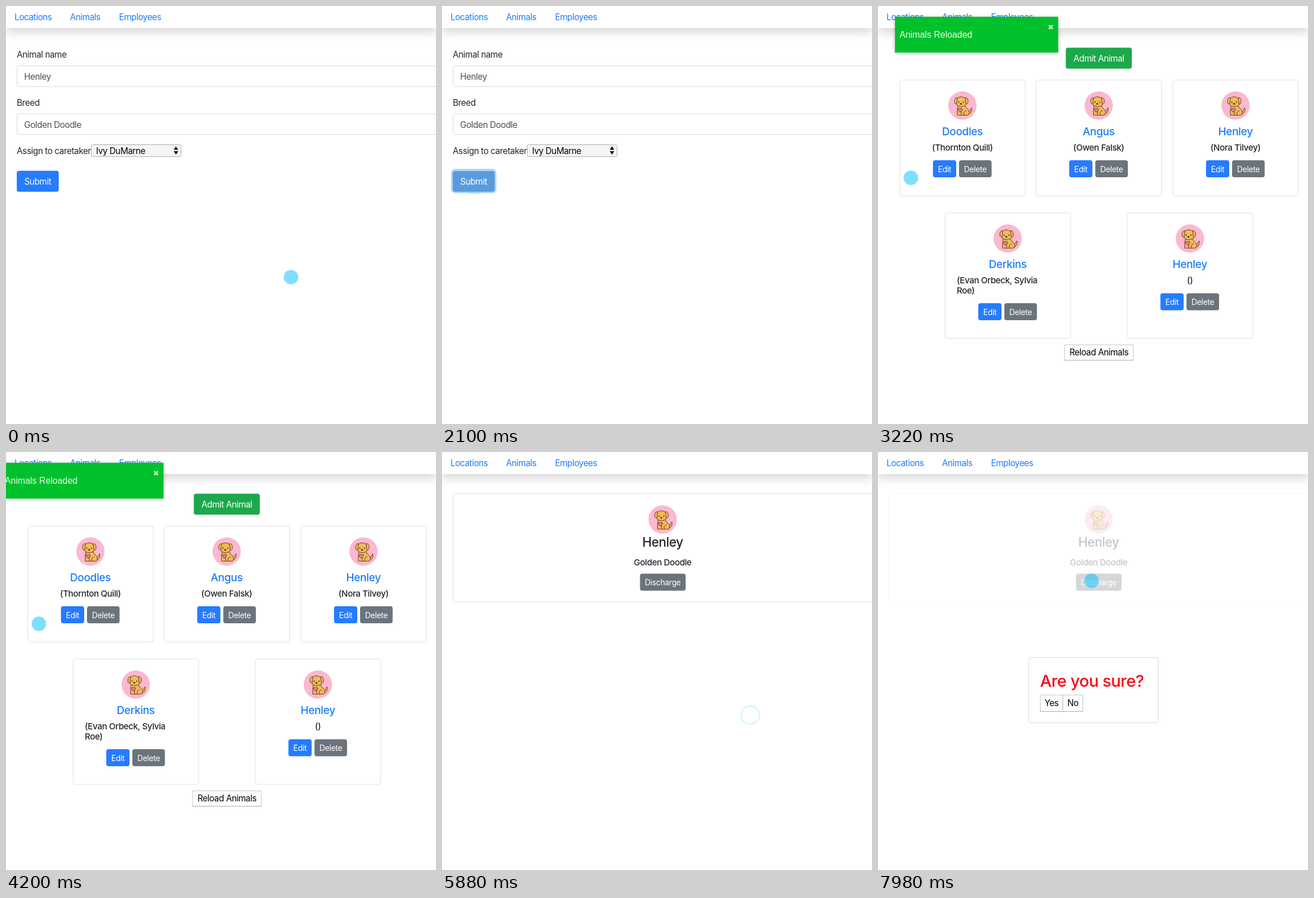
These frames come from a looping animation (759x737 px, 8 s). An HTML page:

```html
<!DOCTYPE html>
<html lang="en">
<head>
<meta charset="utf-8">
<title>Animal kennel</title>
<style>
  html, body { margin: 0; width: 100%; height: 100%; overflow: hidden; background: #fff; }
  svg { display: block; }
  text { font-family: Inter, "Open Sans", sans-serif; letter-spacing: -.028em; white-space: pre; }
  .big { letter-spacing: -.02em; }
  .toast text { font-family: "Liberation Sans", Arial, sans-serif; letter-spacing: 0; }
  .toast .close { font-family: "DejaVu Sans", sans-serif; }
  .nav { filter: drop-shadow(0 8px 8px rgba(0, 0, 0, .15)); }
  .toast rect { filter: drop-shadow(0 1px 3px rgba(0, 0, 0, .3)); }
</style>
</head>
<body>
<svg id="stage" width="759" height="737" viewBox="0 0 759 737"></svg>
<script>
const LOOP = 8000, STEP = 140;
const INK = '#212529', LINK = '#1a7bfb', BLUE = '#267bff', GREY = '#6b747c', LINE = '#dfdfdf';

// Text is placed by the vertical middle of its capitals.
const text = (str, x, cy, { size = 15.2, fill = INK, weight = 400, anchor = 'start', cls = '' } = {}) =>
  `<text class="${cls}" x="${x}" y="${cy + size * .364}" font-size="${size}" fill="${fill}" font-weight="${weight}" text-anchor="${anchor}">${str}</text>`;

const centered = (str, x, cy, options) => text(str, x, cy, { anchor: 'middle', ...options });

const box = (x, y, w, h, { fill = '#fff', stroke = 'none', r = 4, id = '' } = {}) =>
  `<rect id="${id}" x="${x}" y="${y}" width="${w}" height="${h}" rx="${r}" fill="${fill}" stroke="${stroke}"/>`;

const button = (label, x, y, w, h, fill, size = 14, id = '') =>
  box(x, y, w, h, { fill, id }) + centered(label, x + w / 2, y + h / 2 + .5, { size, fill: '#fff' });

const plainButton = (label, x, y, w, h) =>
  box(x + .5, y + .5, w - 1, h - 1, { stroke: '#c8c8c8', r: 0 }) +
  `<path d="M${x} ${y + h - .5}h${w}" stroke="#aaa"/>` +
  centered(label, x + w / 2, y + h / 2 - .5, { fill: '#000' });

const field = (label, value, y) =>
  text(label, 19, y - 19.5) +
  box(19.5, y + .5, 780, 36.5, { stroke: '#d3d7dc' }) +
  text(value, 32, y + 19.5, { fill: '#495057' });

const puppy = (x, y) => `<use href="#puppy" x="${x}" y="${y}"/>`;

function card({ x, y, h, name, keepers, actions }) {
  const lines = keepers.length > 1
    ? keepers.map((line, i) => text(line, x - 90, y + 119 + i * 17.5, { weight: 500 }))
    : [centered(keepers[0], x, y + 119, { weight: 500 })];
  return box(x - 110.5, y + .5, 221.5, h, { stroke: LINE }) +
    puppy(x, y + 45.5) +
    centered(name, x, y + 91, { size: 19, fill: LINK, weight: 500, cls: 'big' }) +
    lines.join('') +
    button('Edit', x - 52, actions, 41, 30, BLUE) +
    button('Delete', x - 6, actions, 57.5, 30, GREY);
}

const cards = [
  { x: 149, y: 130, h: 204.5, name: 'Doodles', keepers: ['(Thornton Quill)'], actions: 272 },
  { x: 389.5, y: 130, h: 204.5, name: 'Angus', keepers: ['(Owen Falsk)'], actions: 272 },
  { x: 631, y: 130, h: 204.5, name: 'Henley', keepers: ['(Nora Tilvey)'], actions: 272 },
  { x: 229, y: 364.5, h: 221, name: 'Derkins', keepers: ['(Evan Orbeck, Sylvia', 'Roe)'], actions: 524 },
  { x: 550.5, y: 364.5, h: 221, name: 'Henley', keepers: ['()'], actions: 506.5 },
];

const puppyArt = `
  <g id="puppy">
    <circle r="25" fill="#fbb8d0"/>
    <g fill="#f6b859" stroke="#4a3521" stroke-width=".9" stroke-linejoin="round">
      <path d="M9 13Q14 11 14.500 6L16.500 4Q18 13 10 16Z"/>
      <path d="M-8 0Q-10 9 -9 17H10Q15 12 9 6Q5 4 5 0Z"/>
      <path d="M-2 17V10M3 17Q1 10 7 9" fill="none"/>
      <path d="M-10 -12Q-3 -19 6 -12Q9 -2 5 0Q-2 4 -9 0Q-12 -3 -10 -12Z"/>
      <path d="M-9 -14Q-14 -14 -14 -7Q-14 -2 -10 -3Z"/>
      <path d="M5 -14Q10 -14 10 -7Q10 -2 6 -3Z"/>
      <path d="M-4 12l-3.500-3.500a2 2 0 0 1 3.500-2.500a2 2 0 0 1 3.500 2.500z" fill="#ee7f8b"/>
    </g>
    <g fill="#3a2818">
      <circle cx="-6.500" cy="-6" r="1.100"/><circle cx="2" cy="-6" r="1.100"/>
      <ellipse cx="-2.500" cy="-3" rx="1.900" ry="1.300"/>
    </g>
  </g>`;

const form =
  field('Animal name', 'Henley', 105) +
  field('Breed', 'Golden Doodle', 189.5) +
  text('Assign to caretaker', 19, 255) +
  box(150.5, 244.5, 158.5, 21, { fill: '#f5f5f5', stroke: '#adadad', r: 3 }) +
  text('Ivy DuMarne', 159, 255, { fill: '#000' }) +
  '<path d="M296 253.500l4-6 4 6zM296 256l4 6 4-6z"/>' +
  '<rect id="focus" x="17.500" y="288.500" width="77" height="40" rx="5.500" fill="none" stroke="#add6ff" stroke-width="3"/>' +
  button('Submit', 19, 290.5, 74, 37, BLUE, 15.2, 'submit');

const list =
  button('Admit Animal', 331.5, 73.5, 116.5, 37, '#1ca84b', 15.2) +
  cards.map(card).join('') +
  plainButton('Reload Animals', 329, 597, 122, 28);

const detail =
  box(19.5, 73.5, 780, 191, { stroke: LINE }) +
  puppy(389.5, 119) +
  centered('Henley', 389.5, 159, { size: 22.5, weight: 500, cls: 'big' }) +
  centered('Golden Doodle', 389.5, 194, { weight: 500 }) +
  button('Discharge', 349.5, 214.5, 80.5, 30, GREY, 14, 'discharge');

const modal =
  box(266, 362.5, 228.5, 115, { stroke: '#d6d6d6' }) +
  text('Are you sure?', 286, 403, { size: 29, fill: '#ff0012', weight: 500, cls: 'big' }) +
  plainButton('Yes', 286, 428, 40.5, 30) +
  plainButton('No', 326, 428, 36, 30);

const toast =
  box(30, 19, 288, 63, { fill: '#00c12b', r: 0 }) +
  text('Animals Reloaded', 38, 50, { size: 15.8, fill: '#e9fbea' }) +
  centered('✖', 305, 37, { size: 13, fill: '#c4f0c8', cls: 'close' });

const nav = box(0, 0, 759, 39, { r: 0 }).replace('<rect', '<rect class="nav"') +
  [['Locations', 15], ['Animals', 113], ['Employees', 199.5]]
    .map(([label, x]) => text(label, x, 19, { fill: LINK })).join('');

document.getElementById('stage').innerHTML = `<defs>${puppyArt}</defs>
  ${nav}
  <g id="form">${form}</g><g id="list">${list}</g><g id="detail">${detail}</g>
  <g id="modal">${modal}</g><g id="toast" class="toast">${toast}</g>
  <circle id="disc" r="12.800" fill="#00bfff" opacity=".5"/>
  <circle id="ring" fill="none" stroke="#00bfff" stroke-width="2.500"/>`;

const el = id => document.getElementById(id);
const show = (id, on) => el(id).setAttribute('display', on ? 'inline' : 'none');
const set = (id, attrs) => Object.entries(attrs).forEach(([k, v]) => el(id).setAttribute(k, v));

// Keys are [time, ...values]; values hold outside the range.
function track(keys, t) {
  const next = keys.findIndex(key => key[0] > t);
  if (next < 1) return keys.at(next).slice(1);
  const a = keys[next - 1], b = keys[next];
  const k = (t - a[0]) / (b[0] - a[0]);
  return a.slice(1).map((v, i) => v + (b[i + 1] - v) * k);
}

const pointerKeys = [
  [0, 503, 478], [280, 480, 448], [560, 420, 372], [840, 330, 282], [980, 272, 267],
  [1120, 187, 266], [1260, 120, 259], [1400, 72, 288], [1540, 58, 303],
  [4200, 58, 303], [4340, 100, 390], [4480, 190, 530], [4620, 310, 602], [4760, 430, 560],
  [4900, 506, 478], [5180, 541, 457], [5320, 544, 452],
  [6300, 544, 452], [6440, 536, 440], [6860, 440, 300], [7140, 383, 234], [7280, 377, 227],
];
const toastKeys = [
  [2800, -340], [2940, -120], [3080, 14], [3220, 0], [3360, -2], [3500, 0],
  [4060, 0], [4200, -40], [4340, -340],
];
const clicks = [1960, 5740, 7560], CLICK_TIME = 420;

function draw(t) {
  show('form', t < 2520);
  show('list', t >= 2520 && t < 5880);
  show('detail', t >= 5880);
  show('modal', t >= 7700);
  set('detail', { opacity: t >= 7700 ? .25 : 1 });

  show('focus', t >= 2100);
  set('submit', { fill: t >= 2100 ? '#5b9bdd' : t >= 1540 ? '#1069dc' : BLUE });
  set('discharge', { fill: t >= 7140 ? '#5a6268' : GREY });

  const [slide] = track(toastKeys, t);
  set('toast', { transform: `translate(${slide} 0)` });
  show('toast', slide > -330);

  const [x, y] = track(pointerKeys, t);
  const click = clicks.find(c => t >= c && t < c + CLICK_TIME);
  const age = (t - click) / STEP;
  show('disc', click === undefined);
  show('ring', age < 2);
  set('disc', { cx: x, cy: y });
  // The click ripple is centred on the pointer's hot spot, below the disc.
  if (age < 2) set('ring', { cx: x, cy: y + 12, r: 13.2 + 3 * age, opacity: .36 - .18 * age });
}

function tick() {
  draw(Math.floor(performance.now() % LOOP / STEP) * STEP);
  requestAnimationFrame(tick);
}
tick();
</script>
</body>
</html>
```
